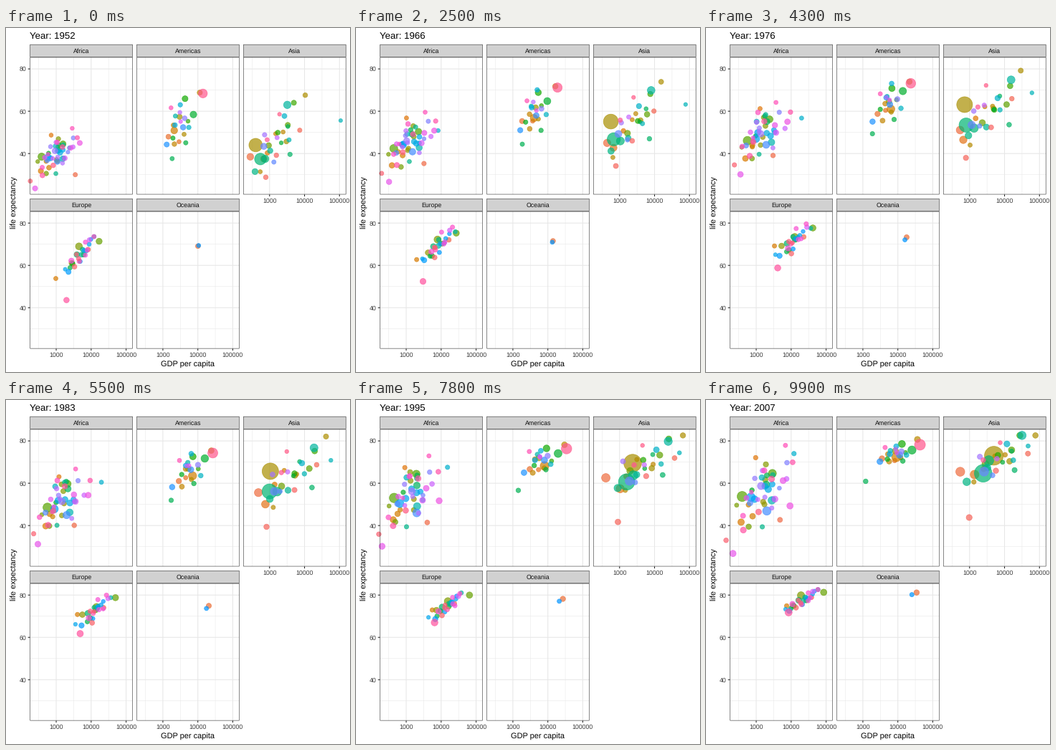
A matplotlib script for the animation above (10 s loop, 480x480 px).

```python
import matplotlib.pyplot as plt
import numpy as np
from matplotlib.animation import FuncAnimation
from matplotlib.patches import Rectangle

SIZE, DPI, FRAMES, COUNT = 480, 72, 100, 142
KNOTS = (1952, 1967, 1977, 1992, 2007)
T = np.linspace(0, 1, FRAMES)
YEARS = 1952 + 55 * T
GAMMA = 2.2 / 1.8
rng = np.random.default_rng(7)
plt.rcParams.update({"font.family": "Liberation Sans", "path.snap": False,
                     "text.hinting": "none"})

# Panels: left and top edges in pixels, y downwards
W, H, STRIP = 143.37, 191.6, 17.8
COLS, ROWS = (33.4, 182.27, 331.13), (40.7, 255.8)
AF, AM, AS = [(x, ROWS[0]) for x in COLS]
EU, OC = [(x, ROWS[1]) for x in COLS[:2]]
TITLES = {AF: "Africa", AM: "Americas", AS: "Asia", EU: "Europe", OC: "Oceania"}
X_LO, X_HI, Y_LO, Y_HI = 2.2486, 5.1887, 20.649, 85.553


def px(log_gdp):
    return (log_gdp - X_LO) / (X_HI - X_LO) * W


def py(life):
    return (Y_HI - life) / (Y_HI - Y_LO) * H


def grey(level):
    return str(level ** GAMMA)


def hcl(hue, c=100, l=65):
    """Polar LUV colours with D65 white, as RGB rows."""
    hue = np.radians(hue)
    u = c * np.cos(hue) / (13 * l) + 0.1978
    v = c * np.sin(hue) / (13 * l) + 0.4683
    y = ((l + 16) / 116) ** 3
    x = 9 * y * u / (4 * v)
    z = 3 * y / v - x / 3 - 5 * y
    rgb = np.stack([3.2405 * x - 1.5371 * y - 0.4985 * z,
                    -0.9693 * x + 1.8760 * y + 0.0416 * z,
                    0.0556 * x - 0.2040 * y + 1.0572 * z], axis=1)
    rgb = np.clip(rgb, 0, 1)
    rgb = np.where(rgb > 0.00304, 1.055 * rgb ** (1 / 2.4) - 0.055, 12.92 * rgb)
    return np.clip(rgb, 0, 1) ** GAMMA


def diameter(pop):
    """Population in millions to marker diameter in pixels."""
    size = 2 + 10 * np.sqrt(np.maximum(pop - 0.06, 0) / 1318.6)
    return 0.75 * (size * 2.845 + 0.945)


dots = {}  # alphabetical rank -> tracks of x, y and diameter


def add(panel, rank, log_gdp, life, pop0, pop1):
    d0, d1 = diameter(pop0), diameter(pop1)
    dots[rank] = (panel[0] + px(log_gdp), panel[1] + py(np.minimum(life, 82.6)),
                  d0 + (d1 - d0) * T)


def landmark(panel, rank, pop, *path):
    """A prominent dot, moving through (income, life) in 1952, 1977 and 2007."""
    gdp, life = zip(*path)
    years = KNOTS[::2]
    add(panel, rank, np.interp(YEARS, years, np.log10(gdp)),
        np.interp(YEARS, years, life), *pop)


def scores(n):
    """Evenly spread normal scores in random order."""
    p = (rng.permutation(n) + 0.5) / n
    return 4.91 * (p ** 0.14 - (1 - p) ** 0.14)


def crowd(panel, n, gdp, gdp_sd, life, life_sd, corr, growth):
    """A drifting cloud: mean at each knot, spread at start and end."""
    wealth, luck, people = scores(n), scores(n), scores(n)
    health = corr * wealth + np.sqrt(1 - corr ** 2) * luck
    phase = rng.uniform(0, 2 * np.pi, (2, n))
    x_mid, y_mid = np.interp(YEARS, KNOTS, gdp), np.interp(YEARS, KNOTS, life)
    x_sd, y_sd = (a + (b - a) * T for a, b in (gdp_sd, life_sd))
    for k in range(n):
        sway_x, sway_y = 0.2 * np.sin(2 * np.pi * T + phase[:, k, None])
        pop = 10 ** (0.75 + 0.5 * people[k])
        add(panel, free.pop(), x_mid + x_sd * (wealth[k] + sway_x),
            y_mid + y_sd * (health[k] + sway_y), pop, pop * growth)


landmark(AS, 24, (556, 1319), (400, 44), (741, 64), (4959, 73))
landmark(AS, 58, (372, 1110), (547, 37.4), (813, 54.2), (2452, 64.7))
landmark(AS, 59, (82, 223), (750, 37.5), (1383, 52.7), (3541, 70.7))
landmark(AS, 66, (86, 127), (3217, 63), (16610, 75.4), (31656, 82.6))
landmark(AS, 97, (41, 169), (685, 43.4), (1176, 54), (2606, 65.5))
landmark(AS, 8, (47, 150), (684, 37.5), (660, 46.9), (1391, 64.1))
landmark(AS, 71, (.2, 2.5), (108382, 55.6), (59265, 69.3), (47307, 77.6))
landmark(AS, 0, (8, 32), (779, 28.8), (786, 38.4), (975, 43.8))
landmark(AM, 134, (158, 301), (13990, 68.4), (24073, 73.4), (42952, 78.2))
landmark(AM, 14, (57, 190), (2109, 50.9), (6660, 61.5), (9066, 72.4))
landmark(AM, 20, (15, 33), (11367, 68.8), (22091, 74.2), (36319, 80.7))
landmark(AM, 53, (3, 8), (1840, 37.6), (1875, 49.9), (1202, 60.9))
landmark(EU, 131, (22, 71), (1969, 43.6), (4269, 59.5), (8458, 71.8))
landmark(EU, 12, (3, 5), (974, 53.8), (3528, 69.9), (7446, 74.9))
landmark(AF, 94, (33, 135), (1077, 36.3), (1982, 44.5), (2014, 46.9))
landmark(AF, 117, (14, 44), (4725, 45), (8028, 55.5), (9270, 49.3))
landmark(AF, 75, (1, 6), (2388, 42.7), (21951, 57.4), (12057, 74))
landmark(AF, 3, (4, 12), (3521, 30), (3009, 39.5), (4797, 42.7))
landmark(OC, 5, (9, 20), (10040, 69.1), (18334, 73.5), (34435, 81.2))
landmark(OC, 91, (2, 4), (10557, 69.4), (16234, 72.2), (25185, 80.2))

free = [int(r) for r in rng.permutation(COUNT) if r not in dots]
crowd(AF, 48, (2.98, 3.07, 3.13, 3.07, 3.16), (.29, .41),
      (39.2, 45.4, 49.7, 53.6, 55), (5, 9), .55, 3)
crowd(AM, 21, (3.47, 3.62, 3.75, 3.75, 3.92), (.2, .24),
      (53.3, 60.4, 64.4, 69.5, 73.7), (8.3, 3.2), .6, 2.2)
crowd(AS, 25, (3.25, 3.43, 3.6, 3.68, 3.83), (.38, .52),
      (47.5, 55.8, 60.6, 67.4, 71.6), (8.5, 5.8), .65, 2.8)
crowd(EU, 28, (3.72, 3.98, 4.13, 4.16, 4.36), (.24, .27),
      (65.6, 70.1, 72.1, 74.6, 77.8), (4.3, 2.6), .85, 1.25)

fig = plt.figure(figsize=(SIZE / DPI, SIZE / DPI), dpi=DPI, facecolor="white")
ax = fig.add_axes([0, 0, 1, 1])
ax.set(xlim=(0, SIZE), ylim=(SIZE, 0))
ax.axis("off")


def line(x0, y0, x1, y1, level, lw):
    ax.plot([x0, x1], [y0, y1], color=grey(level), lw=lw, zorder=1,
            solid_capstyle="butt")


def label(x, y, s, size=8.8, level=0, **kw):
    return ax.text(x, y, s, fontsize=size, color=grey(level), va="baseline", **kw)


def box(x, y, w, h, fill):
    ax.add_patch(Rectangle((x + .27, y + .27), w - .54, h - .54, fc=fill,
                           ec=grey(.2), lw=.54, zorder=4))


def draw_panel(panel, name):
    left, top = panel
    bottom = top + H
    for lw, xs, ys in ((.53, (2.5, 3.5, 4.5), (30, 50, 70)),
                       (1.07, (3, 4, 5), (40, 60, 80))):
        for y in ys:
            line(left, top + py(y), left + W, top + py(y), .922, lw)
        for x in xs:
            line(left + px(x), top, left + px(x), bottom, .922, lw)
    box(left, top, W, H, "none")
    box(left, top - STRIP, W, STRIP, grey(.851))
    label(left + W / 2, top - 5.6, name, level=.1, ha="center", zorder=5)
    if left == COLS[0]:
        for y in (40, 60, 80):
            line(left - 2.75, top + py(y), left, top + py(y), .2, 1.07)
            label(left - 4.95, top + py(y) + 3.3, str(y), level=.3, ha="right")
    if top == ROWS[1] or left == COLS[2]:
        for x in (3, 4, 5):
            line(left + px(x), bottom, left + px(x), bottom + 2.75, .2, 1.07)
            label(left + px(x), bottom + 12, str(10 ** x), level=.3, ha="center")


for panel, name in TITLES.items():
    draw_panel(panel, name)
label((COLS[0] + COLS[2] + W) / 2, 472.6, "GDP per capita", 11, ha="center")
label(14.3, (ROWS[0] + ROWS[1] + H) / 2, "life expectancy", 11, ha="center",
      rotation=90, rotation_mode="anchor")
title = label(COLS[0], 15.2, "", 13.2)

xs, ys, widths = np.array([dots[r] for r in range(COUNT)]).transpose(1, 2, 0)
colors = hcl(15 + 360 * np.arange(COUNT) / COUNT)
rgba = np.column_stack([colors, np.full(COUNT, 0.7)])
cloud = ax.scatter(xs[0], ys[0], c=rgba, edgecolors=rgba, linewidths=.71, zorder=3)


def update(i):
    cloud.set_offsets(np.column_stack([xs[i], ys[i]]))
    cloud.set_sizes(widths[i] ** 2)
    title.set_text(f"Year: {YEARS[i]:.0f}")
    return cloud, title


anim = FuncAnimation(fig, update, frames=FRAMES, interval=100, repeat=True,
                     repeat_delay=0, blit=False)
plt.show()
```
